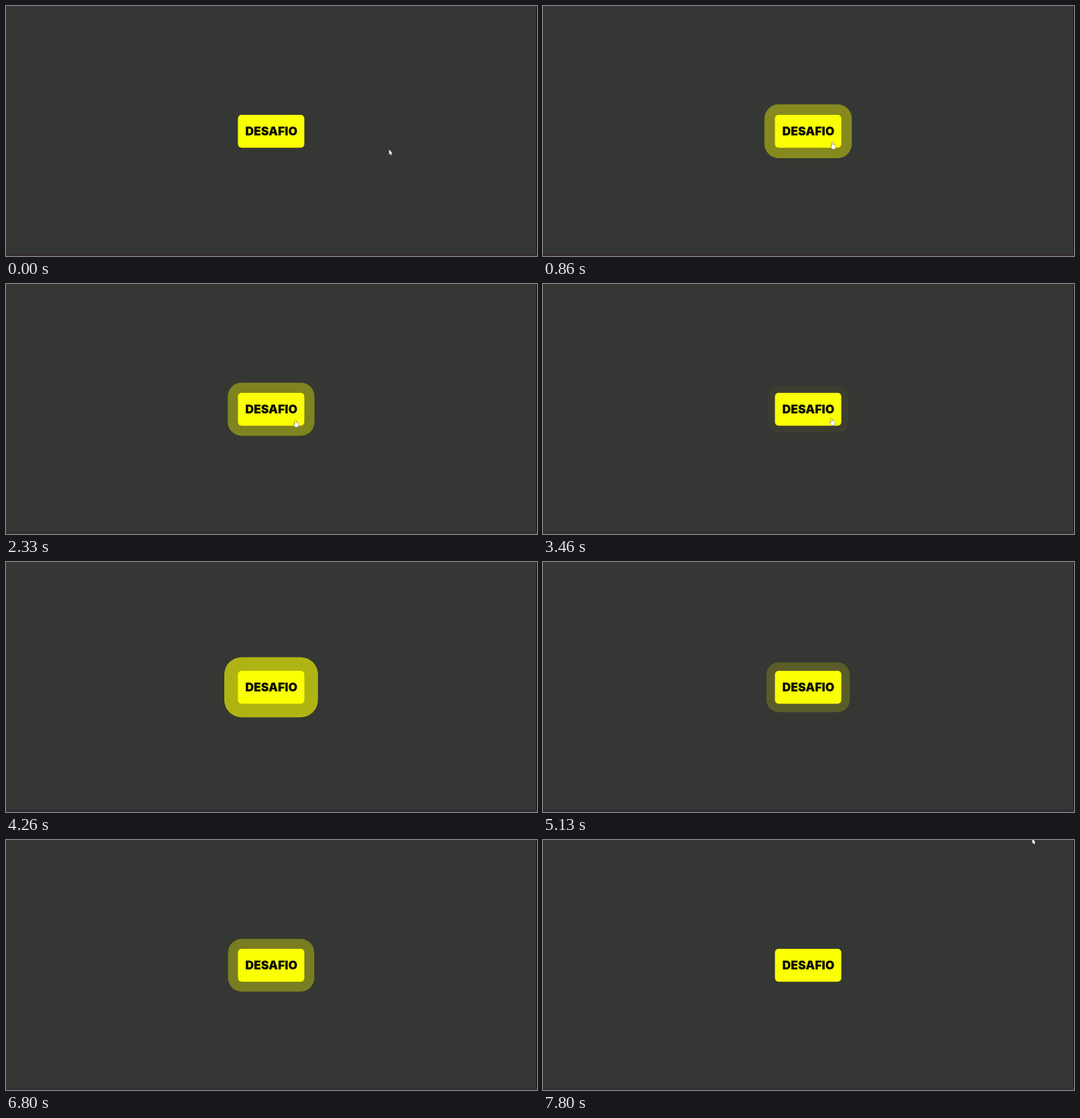
Write an HTML page with a canvas that moves like this. It is 720 by 340 pixels and loops after 8 s.

```html
<!DOCTYPE html>
<html lang="pt">
<head>
<meta charset="utf-8">
<title>Desafio</title>
<style>
  html, body { margin: 0; width: 100%; height: 100%; overflow: hidden; background: #343733; }
  canvas { display: block; }
</style>
</head>
<body>
<canvas id="stage" width="720" height="340"></canvas>
<script>
const ctx = document.getElementById('stage').getContext('2d');
const LOOP = 8000, STEP = 1000 / 15, PULSE = 1500;
const HOVER_IN = 430, HOVER_OUT = 7060;
const BUTTON = { x: 314.5, y: 148, w: 90, h: 44.7, r: 5 };

// Cursor stops: time, x, y
const ENTER = [[60, 519.5, 195], [260, 460, 195], [420, 404, 191], [560, 392, 185],
               [3380, 392, 185], [3460, 391, 183], [3530, 390, 180]];
const LEAVE = [[6990, 398, 160], [7060, 406, 153], [7330, 540, 70], [7670, 663.5, -2]];

const lerp = (a, b, k) => a + (b - a) * k;

function along(stops, t) {
  if (t <= stops[0][0]) return stops[0].slice(1);
  for (let i = 1; i < stops.length; i++) {
    const [t0, x0, y0] = stops[i - 1], [t1, x1, y1] = stops[i];
    if (t < t1) {
      const k = (t - t0) / (t1 - t0);
      return [lerp(x0, x1, k), lerp(y0, y1, k)];
    }
  }
  return stops[stops.length - 1].slice(1);
}

function roundBox({ x, y, w, h, r }, grow, fill) {
  ctx.beginPath();
  ctx.roundRect(x - grow, y - grow, w + 2 * grow, h + 2 * grow, r + grow);
  ctx.fillStyle = fill;
  ctx.fill();
}

function pulse(t) {
  const p = ((t - HOVER_IN) % PULSE) / PULSE * 2;
  const spread = p < 1 ? lerp(9, 18, p) : lerp(18, 22.5, p - 1);
  const alpha = 0.71 * (1 - Math.abs(p - 1));
  roundBox(BUTTON, spread, `rgba(250, 255, 0, ${alpha})`);
}

function shape(x, y, path, outline) {
  ctx.save();
  ctx.translate(x, y);
  const p = new Path2D(path);
  ctx.lineWidth = 0.8;
  ctx.lineJoin = 'round';
  ctx.strokeStyle = outline;
  ctx.stroke(p);
  ctx.fillStyle = '#fff';
  ctx.fill(p);
  ctx.restore();
}

const arrow = (x, y) =>
  shape(x, y, 'M0 0V7L1.5 5.7L2.5 8L3.6 7.5L2.7 5.3H4.5Z', '#222');
const hand = (x, y) =>
  shape(x, y, 'M0 .6Q.7 -.3 1.3 .6V3.6L4.2 4.4Q5 4.8 4.8 6L4 9.5H.2L-2.2 6.2Q-2 5 -.9 5.7L0 6.4Z', '#444');

function draw(t) {
  ctx.fillStyle = '#343733';
  ctx.fillRect(0, 0, 720, 340);
  ctx.fillStyle = '#352f35';
  ctx.fillRect(0, 336.5, 720, 3.5);
  ctx.fillStyle = '#151715';
  ctx.fillRect(719, 0, 1, 337);

  const hover = t >= HOVER_IN && t < HOVER_OUT;
  if (hover) pulse(t);
  roundBox(BUTTON, 0, '#fbff04');

  ctx.font = '900 16px Inter, sans-serif';
  ctx.textAlign = 'center';
  ctx.textBaseline = 'alphabetic';
  ctx.fillStyle = '#050700';
  ctx.fillText('DESAFIO', 359.8, 176.2);

  const stops = t < 3560 ? ENTER : t >= 6990 ? LEAVE : null;
  if (stops) (hover ? hand : arrow)(...along(stops, t));
}

function frame(now) {
  const t = now % LOOP;
  draw(Math.min(Math.floor((t + 9) / STEP), 117) * STEP);
  requestAnimationFrame(frame);
}
requestAnimationFrame(frame);
</script>
</body>
</html>
```
